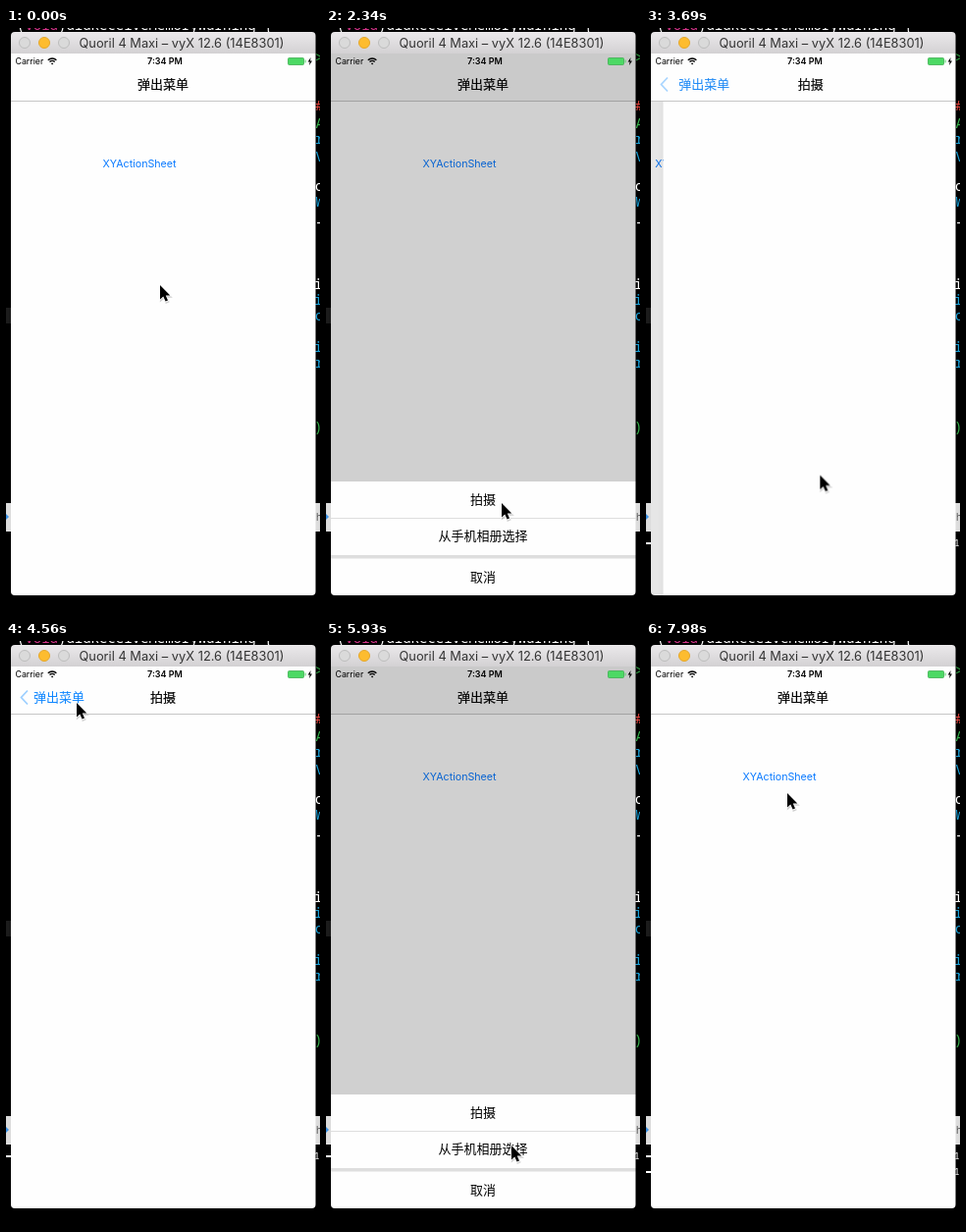
Animation of 320x596 px, one loop 8 s. Source, as an HTML page:

```html
<!DOCTYPE html>
<html lang="zh-CN">
<head>
<meta charset="utf-8">
<title>弹出菜单</title>
<style>
  /* push: navigation progress, sheet: action sheet, modal: full-screen page */
  @property --push { syntax: '<number>'; inherits: true; initial-value: 0; }
  @property --sheet { syntax: '<number>'; inherits: true; initial-value: 0; }
  @property --modal { syntax: '<number>'; inherits: true; initial-value: 0; }

  html, body { margin: 0; width: 100%; height: 100%; overflow: hidden; background: #000; }
  svg {
    display: block; width: 100vw; height: 100vh;
    font: 13px 'Noto Sans CJK SC', 'Noto Sans CJK', sans-serif;
    animation:
      push 8s infinite cubic-bezier(.22, .58, .36, 1),
      sheet 8s infinite ease-in-out,
      modal 8s infinite cubic-bezier(.25, .6, .3, 1);
  }
  .mid { text-anchor: middle; }
  .ui { font-family: Inter, sans-serif; }
  .code { font: 14px 'Noto Sans Mono', monospace; fill: #fff; }
  .code .key { fill: #d6338a; }
  .code .type { fill: #18a0d8; }
  .code .note { fill: #35b04a; }
  .code .str { fill: #e0443e; }
  .log { font-size: 9.5px; }
  .link { font-size: 10.7px; fill: #0a7aff; }

  .home { transform: translateX(calc(-93px * var(--push))); }
  .shade { opacity: calc(.1 * var(--push)); }
  .detail { transform: translateX(calc(311px * (1 - var(--push)))); }
  .edge { opacity: calc(4 * var(--push) * (1 - var(--push))); }
  .back {
    color: color-mix(in srgb, #0a84ff calc(100% * var(--push)), #000);
    fill: currentColor; stroke: currentColor;
    stroke-width: calc(.18px * (1 - var(--push)));
    opacity: calc(1 - 1.6 * var(--push) * (1 - var(--push)));
    transform: translateX(calc(-106px * var(--push) * (.77 + .23 * var(--push))));
  }
  .chevron { opacity: calc(var(--push) * var(--push) * var(--push)); }
  .title {
    stroke: #000; stroke-width: .18px;
    opacity: var(--push);
    transform: translateX(calc(190px * (1 - var(--push))));
  }
  .modal { transform: translateY(calc(552px * (1 - var(--modal)))); }
  .dim { opacity: calc(.18 * var(--sheet)); }
  .tint { opacity: calc(.03 * var(--sheet)); }
  .sheet { transform: translateY(calc(116px * (1 - var(--sheet)))); }
  .panel { fill: color-mix(in srgb, #fefefe calc(100% * var(--sheet)), #ececec); }
  .gap { fill: #dedede; opacity: calc(2 * var(--sheet) - 1); }

  .open { animation: open 8s infinite; }
  .dismiss { animation: dismiss 8s infinite; }
  .log1 { animation: log1 8s infinite step-end; }
  .log2 { animation: log2 8s infinite step-end; }
  .cursor { animation: cursor 8s infinite ease-in-out; }

  @keyframes push {
    0%, 41.875% { --push: 0; }
    48%, 57.5% { --push: 1; }
    62.5%, 100% { --push: 0; }
  }
  @keyframes sheet {
    0%, 20% { --sheet: 0; }
    23.1%, 41.875% { --sheet: 1; }
    44.7%, 65.4% { --sheet: 0; }
    68.5%, 78.5% { --sheet: 1; }
    81.3%, 100% { --sheet: 0; }
  }
  @keyframes modal {
    0%, 78.5% { --modal: 0; }
    85%, 94.25% { --modal: 1; }
    99.5%, 100% { --modal: 0; }
  }
  @keyframes open {
    0%, 17.4% { opacity: 1; }
    17.41%, 19.5% { opacity: .2; }
    21.5%, 63.9% { opacity: 1; }
    63.91%, 65% { opacity: .2; }
    67%, 100% { opacity: 1; }
  }
  @keyframes dismiss {
    0%, 93.35% { opacity: 1; }
    93.36%, 94.25% { opacity: .2; }
    96.5%, 100% { opacity: 1; }
  }
  @keyframes log1 { 0% { opacity: 0; } 41.875%, 100% { opacity: 1; } }
  @keyframes log2 { 0% { opacity: 0; } 78.5%, 100% { opacity: 1; } }
  @keyframes cursor {
    0%, 3.75% { transform: translate(157px, 262px); }
    13.25%, 15.1% { transform: translate(145px, 146px); }
    16.6%, 21.5% { transform: translate(150px, 135px); }
    29.25%, 31.9% { transform: translate(179px, 484px); }
    34%, 45% { transform: translate(183px, 477px); }
    52% { transform: translate(77px, 74px); }
    55.5%, 58.5% { transform: translate(72px, 63px); }
    63.2%, 66% { transform: translate(140px, 136px); }
    72.6%, 73.4% { transform: translate(192px, 523px); }
    74.1% { transform: translate(189px, 514px); }
    75.9%, 79.5% { transform: translate(186px, 508px); }
    86.9% { transform: translate(149px, 211px); }
    89.25%, 95.5% { transform: translate(131px, 194px); }
    99.75%, 100% { transform: translate(144px, 155px); }
  }
</style>
</head>
<body>
<svg viewBox="0 0 320 596" preserveAspectRatio="none">
  <defs>
    <linearGradient id="bar" x2="0" y2="1">
      <stop stop-color="#ebe9eb"/><stop offset="1" stop-color="#d3d1d3"/>
    </linearGradient>
    <linearGradient id="edge">
      <stop stop-opacity="0"/><stop offset="1" stop-opacity=".14"/>
    </linearGradient>
    <clipPath id="screen"><path d="M5 26H315.5V574a4 4 0 0 1-4 4H9a4 4 0 0 1-4-4Z"/></clipPath>
  </defs>

  <!-- editor behind the window -->
  <rect width="320" height="596"/>
  <g class="code">
    <text x="11" y="2">(<tspan class="key">void</tspan>)didReceiveMemoryWarning {</text>
    <text x="315" y="35" class="note">&gt;</text>
    <text x="315" y="84" class="str">#</text>
    <text x="315.5" y="102" class="note">A</text>
    <text x="315" y="118" class="type">r</text>
    <text x="315.5" y="136" class="type">V</text>
    <text x="315" y="166">o</text>
    <text x="315.5" y="182" class="type">W</text>
    <text x="315" y="203">-</text>
    <text x="314" y="266">i</text>
    <text x="314" y="282" class="type">i</text>
    <text x="315" y="298" class="type">o</text>
    <text x="314" y="330" class="type">i</text>
    <text x="315" y="346" class="type">r</text>
    <text x="314" y="411" class="note">)</text>
  </g>
  <path fill="#1c1c1c" d="M0 285h5v16h-5z"/>
  <path fill="#dcdcdc" d="M0 484h320v29H0z"/>
  <path fill="#3b93e8" d="M0 495l3 3-3 3z"/>
  <text x="316" y="502" class="ui" font-size="10" fill="#555">h</text>
  <g class="code">
    <g class="log1"><path d="M0 524h5v2h-5z"/><text x="314" y="528" class="log">10</text></g>
    <g class="log2"><path d="M0 540h5v2h-5z"/><text x="314" y="544" class="log">10</text></g>
  </g>

  <!-- window title bar -->
  <path fill="url(#bar)" d="M5 26V8a4 4 0 0 1 4-4H311.5a4 4 0 0 1 4 4V26Z"/>
  <g fill="#dadada" stroke="#bdbdbd">
    <circle cx="19" cy="15" r="5.5"/>
    <circle cx="39" cy="15" r="5.5" fill="#fdbc2f" stroke="#e5a72a"/>
    <circle cx="59" cy="15" r="5.5"/>
  </g>
  <text x="179" y="20" class="ui mid" font-size="12.85" fill="#333">Quoril 4 Maxi – vyX 12.6 (14E8301)</text>

  <g clip-path="url(#screen)">
    <rect x="5" y="26" width="311" height="552" fill="#fefefe"/>
    <g class="home">
      <text x="136" y="142" class="ui link mid open">XYActionSheet</text>
    </g>
    <rect class="shade" x="5" y="74" width="311" height="504"/>
    <g class="detail">
      <rect class="edge" x="-1" y="74" width="6" height="504" fill="url(#edge)"/>
      <rect x="5" y="74" width="311" height="504" fill="#fefefe"/>
    </g>

    <!-- navigation bar -->
    <rect x="5" y="26" width="311" height="48" fill="#fefefe"/>
    <rect class="tint" x="5" y="26" width="311" height="48"/>
    <rect x="5" y="74" width="311" height="1" fill="#c6c6c6"/>
    <path class="chevron" d="M22 50.5L15.5 57.5 22 64.5" fill="none" stroke="#9ccfff" stroke-width="1.7"/>
    <text x="160" y="61.6" class="mid back">弹出菜单</text>
    <text x="160" y="61.6" class="mid title">拍摄</text>

    <g class="modal">
      <rect x="5" y="26" width="311" height="552" fill="#fefefe"/>
      <text x="135" y="203" class="ui link mid dismiss">Dismiss</text>
    </g>

    <rect class="dim" x="5" y="26" width="311" height="552"/>

    <!-- status bar -->
    <g class="ui" font-size="9">
      <text x="9.5" y="37.2" font-size="8.8">Carrier</text>
      <text x="162" y="37.2" class="mid" font-weight="600">7:34 PM</text>
    </g>
    <g fill="none" stroke="#000" stroke-width="1.4">
      <path d="M42.8 32.7a6.2 6.2 0 0 1 8.6 0M44.5 34.6a3.7 3.7 0 0 1 5.2 0"/>
      <path d="M47.1 37.4l-1.2-1.3a1.7 1.7 0 0 1 2.4 0z" fill="#000" stroke="none"/>
    </g>
    <rect x="287.5" y="30.5" width="16" height="7" rx="1" fill="#4cd964" stroke="#3fae52" stroke-width=".8"/>
    <path fill="#4cd964" d="M304.6 32.5h1v3h-1z"/>
    <path d="M310.6 30l-3 4.4h2l-.6 3.6 3-4.5h-2z"/>

    <!-- action sheet -->
    <g class="sheet">
      <rect class="panel" x="5" y="462" width="311" height="116"/>
      <path class="gap" d="M5 499h311v1H5zM5 537h311v3.5H5z"/>
      <text x="160" y="485" class="mid">拍摄</text>
      <text x="160" y="522.3" class="mid">从手机相册选择</text>
      <text x="160" y="563.6" class="mid">取消</text>
    </g>
  </g>

  <g class="cursor">
    <path d="M0 0V14.4L3.3 11.4 5.6 16.6 8 15.5 5.8 10.5H10.3Z" opacity=".18" transform="translate(.6 1.4)" stroke="#000" stroke-width="1.6"/>
    <path d="M0 0V14.4L3.3 11.4 5.6 16.6 8 15.5 5.8 10.5H10.3Z" stroke="#fff" stroke-width="1.6" paint-order="stroke"/>
  </g>
</svg>
</body>
</html>
```
